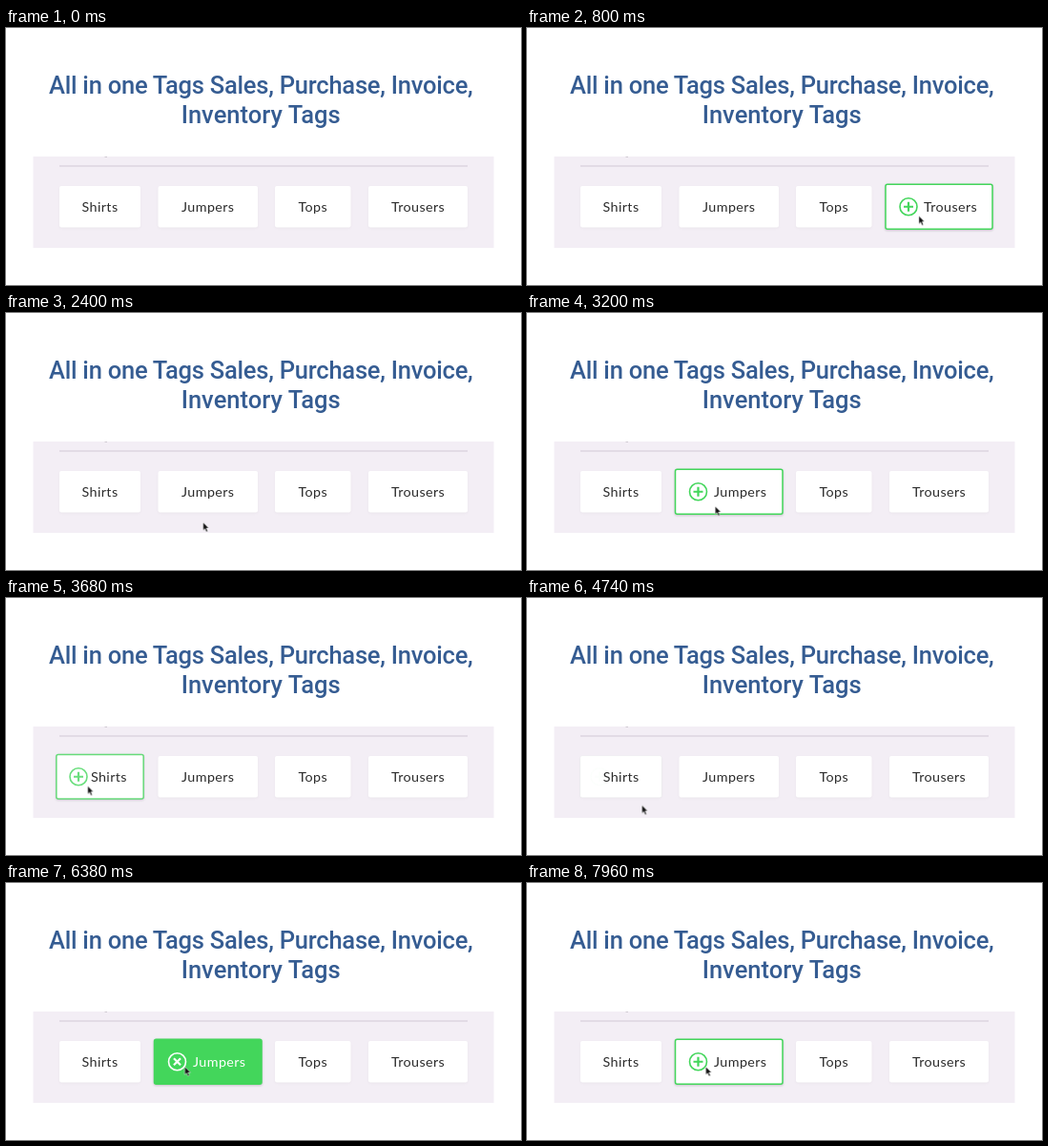
An HTML page for the animation above (8 s loop, 540 by 270 pixels).

```html
<!DOCTYPE html>
<html lang="en">
<head>
<meta charset="utf-8">
<title>Tags</title>
<style>
  /* --p: hover progress, --s: selected progress */
  @property --p { syntax: "<number>"; inherits: true; initial-value: 0; }
  @property --s { syntax: "<number>"; inherits: true; initial-value: 0; }

  html, body { margin: 0; width: 100%; height: 100%; overflow: hidden; background: #fff; }
  svg { display: block; width: 540px; height: 270px; }

  .title {
    font: 500 25.5px Roboto, "Open Sans", sans-serif;
    letter-spacing: -.23px;
    fill: #355c92;
    text-anchor: middle;
  }
  .title .second { letter-spacing: .05px; }

  .tag {
    --green: #43d65b;
    --ink: color-mix(in srgb, #fff calc(var(--s) * 100%), #2c2c2c);
    --line: color-mix(in srgb, #fff calc(var(--s) * 100%), var(--green));
    animation: 8s ease infinite;
  }
  .tag rect {
    x: calc(var(--w) / -2 - 4px * var(--p));
    y: calc(-21.75px - 1.75px * var(--p));
    width: calc(var(--w) + 8px * var(--p));
    height: calc(43.5px + 3.5px * var(--p));
    rx: 2px;
    fill: color-mix(in srgb, var(--green) calc(var(--s) * 100%), #fff);
    stroke: var(--green);
    stroke-width: 1.5px;
    stroke-opacity: var(--p);
    filter: drop-shadow(0 1px 1.2px rgb(70 60 80 / calc(.05 + .2 * var(--p))));
  }
  .tag text {
    font: 400 14.3px Lato, "Open Sans", sans-serif;
    letter-spacing: .4px;
    text-anchor: middle;
    fill: var(--ink);
    transform: translateX(calc(12px * var(--p)));
  }
  .icon {
    fill: none;
    stroke: var(--line);
    opacity: var(--p);
    transform: translateX(calc(20px - var(--w) / 2)) rotate(calc(45deg * var(--s)));
  }

  .shirts { --w: 85px; animation-name: shirts; }
  .jumpers { --w: 104.5px; animation-name: jumpers, select; }
  .tops { --w: 79.5px; animation-name: tops; }
  .trousers { --w: 104px; animation-name: trousers; }
  .cursor { animation: move 8s linear infinite; }

  @keyframes trousers {
    0%, 2.5%, 14.5%, 100% { --p: 0; }
    5%, 12% { --p: 1; }
  }
  @keyframes tops {
    0%, 18.22%, 28.9%, 100% { --p: 0; }
    20.72%, 26.4% { --p: 1; }
  }
  @keyframes jumpers {
    0%, 32.1%, 43.25%, 65.04% { --p: 0; }
    34.6%, 40.75%, 67.54%, 100% { --p: 1; }
  }
  @keyframes shirts {
    0%, 44.8%, 59.6%, 100% { --p: 0; }
    47.3%, 57.1% { --p: 1; }
  }
  @keyframes select {
    0%, 77.1%, 99.4%, 100% { --s: 0; }
    79.6%, 96.9% { --s: 1; }
  }

  @keyframes move {
    0%, .7% { transform: translate(513px, 190px); }
    2.3% { transform: translate(486px, 197px); }
    4.5% { transform: translate(442px, 201px); animation-timing-function: ease-out; }
    8%, 9.75% { transform: translate(411px, 197px); animation-timing-function: ease-in; }
    12% { transform: translate(403px, 211px); }
    14.25% { transform: translate(375px, 222px); }
    16.25% { transform: translate(335px, 221px); }
    17.5% { transform: translate(317px, 214px); }
    18.75% { transform: translate(305.7px, 205px); animation-timing-function: ease-out; }
    22.75%, 24.5% { transform: translate(302px, 197px); animation-timing-function: ease-in; }
    26.4% { transform: translate(290px, 210px); }
    28.1% { transform: translate(245px, 221px); }
    30% { transform: translate(206.7px, 220px); }
    32.1% { transform: translate(202.5px, 208.5px); animation-timing-function: ease-out; }
    34.5%, 38.75% { transform: translate(202px, 196px); animation-timing-function: ease-in; }
    40.75% { transform: translate(192px, 211px); }
    42.2% { transform: translate(150px, 222px); }
    43.6% { transform: translate(112px, 219px); }
    44.9% { transform: translate(92px, 208.5px); }
    46% { transform: translate(85.7px, 197.5px); animation-timing-function: ease-out; }
    48.25%, 55.25% { transform: translate(83px, 194.5px); animation-timing-function: ease-in; }
    57.1% { transform: translate(90px, 210px); }
    60.5% { transform: translate(138px, 222px); }
    63.5% { transform: translate(178px, 217px); }
    65.04% { transform: translate(188px, 208.5px); }
    66.5% { transform: translate(189.5px, 195px); animation-timing-function: ease-out; }
    69.75%, 100% { transform: translate(187.5px, 193px); }
  }
</style>
</head>
<body>
<svg viewBox="0 0 540 270">
  <defs>
    <clipPath id="panel"><rect x="28.5" y="135" width="483" height="96"/></clipPath>
    <g id="plus">
      <circle r="9" stroke-width="1.6"/>
      <path d="M-5 0H5M0-5V5" stroke-width="2.2"/>
    </g>
  </defs>

  <g class="title">
    <text x="267.2" y="69">All in one Tags Sales, Purchase, Invoice,</text>
    <text class="second" x="267.2" y="100">Inventory Tags</text>
  </g>

  <rect x="28.5" y="135" width="483" height="96" fill="#f3eef5"/>
  <rect x="56" y="144.2" width="428" height="1.6" fill="#dfd8e1"/>
  <rect x="103.5" y="135" width="2.5" height=".8" fill="#c8c2ca"/>

  <g transform="translate(98.5 187.75)"><g class="tag shirts">
    <rect/><use class="icon" href="#plus"/><text y="5.2">Shirts</text>
  </g></g>
  <g transform="translate(211.75 187.75)"><g class="tag jumpers">
    <rect/><use class="icon" href="#plus"/><text y="5.2">Jumpers</text>
  </g></g>
  <g transform="translate(321.75 187.75)"><g class="tag tops">
    <rect/><use class="icon" href="#plus"/><text y="5.2">Tops</text>
  </g></g>
  <g transform="translate(432 187.75)"><g class="tag trousers">
    <rect/><use class="icon" href="#plus"/><text y="5.2">Trousers</text>
  </g></g>

  <g clip-path="url(#panel)">
    <path class="cursor" d="M0 0V8.4L1.9 6.7 3.3 9.9 4.8 9.2 3.4 6.1H5.9Z" fill="#111" stroke="#fff" stroke-width=".5"/>
  </g>
</svg>
</body>
</html>
```
